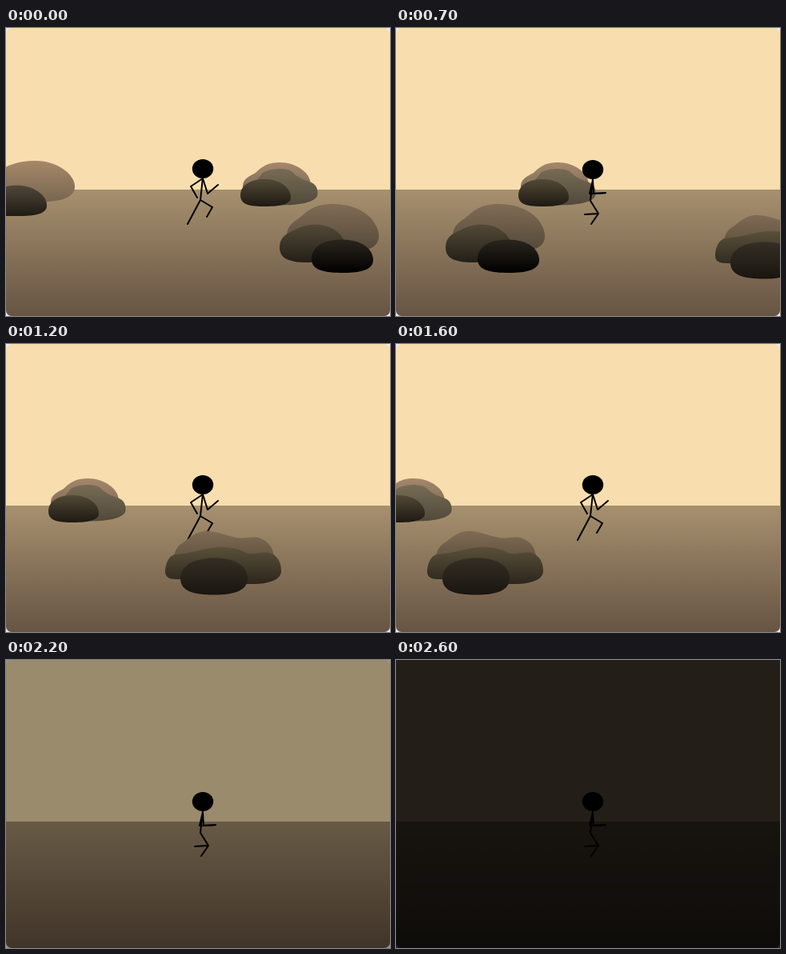
Recreate the animation shown at these times as an HTML page. Size 480 by 360 pixels, loop 2700 ms.

```html
<!DOCTYPE html>
<html lang="en">
<head>
<meta charset="utf-8">
<title>Desert run</title>
<style>
  html, body { margin: 0; width: 100%; height: 100%; overflow: hidden; background: #e5f0ff; }
  svg { display: block; width: 480px; height: 360px; }
  .pose { fill: none; stroke: #000; stroke-width: 2; stroke-linecap: round; stroke-linejoin: round; }
  .pose ellipse { fill: #000; stroke: none; }
</style>
</head>
<body>
<svg viewBox="0 0 480 360">
  <defs>
    <clipPath id="stage"><rect width="480" height="360" rx="7"/></clipPath>
  </defs>
  <g clip-path="url(#stage)">
    <rect width="480" height="360" fill="#f8deae"/>
    <rect id="ground" y="202" width="480" height="158"/>
    <g id="far"></g>
    <g id="runner">
      <g class="pose">
        <ellipse cx="246" cy="176" rx="13.2" ry="12"/>
        <path d="M246 187L243 215M246 188L231 198L239 212M246 188L252 207L265 196M243 215L227 245M243 215L258 224L251 236"/>
      </g>
      <g class="pose">
        <ellipse cx="246" cy="175" rx="13" ry="12"/>
        <path d="M246 186L243 214M246 187L230 196L238 211M246 187L252 206L264 193M243 214L233 227L218 233M243 214L258 222L265 235"/>
      </g>
      <g class="pose">
        <ellipse cx="246" cy="177" rx="13.2" ry="12"/>
        <path d="M246 188L243 216M246 190L242 207L262 206M246 190L247 207L261 206.5M243 216L253 232L244 245M253 232L236 233"/>
      </g>
    </g>
    <g id="near"></g>
  </g>
  <rect id="fade" width="480" height="360"/>
</svg>
<script>
const STEP = 100, STEPS = 27;
const NS = 'http://www.w3.org/2000/svg';
const $ = id => document.getElementById(id);

function add(parent, tag, attrs) {
  const el = document.createElementNS(NS, tag);
  for (const k in attrs) el.setAttribute(k, attrs[k]);
  return parent.appendChild(el);
}

let gradients = 0;
function shade(top, bottom) {
  const id = 'shade' + gradients++;
  const g = add(document.querySelector('defs'), 'linearGradient', { id, x2: 0, y2: 1 });
  add(g, 'stop', { 'stop-color': top });
  add(g, 'stop', { offset: 1, 'stop-color': bottom });
  return `url(#${id})`;
}

// Lobes run from back to front: top colour, bottom colour, outline.
function rocks(layer, lobes) {
  for (const [top, bottom, d] of lobes) add(layer, 'path', { d, fill: shade(top, bottom) });
}

const far = $('far'), near = $('near'), fade = $('fade');
const poses = [...$('runner').children];
$('ground').setAttribute('fill', shade('#a6906e', '#675443'));

rocks(far, [
  ['#a68869', '#786650', 'M-14 182C4 169 20 166 38 166C64 166 86 183 86 198C86 211 70 217 48 217H-14Z'],
  ['#50473a', '#1f1b14', 'M-14 202C0 197 10 196 20 197C37 199 51 210 51 222C51 231 40 235 18 235H-14Z'],
  ['#a5876c', '#7a6a54', 'M296 200C295 189 303 186 312 181C322 171 330 168 342 168C363 168 381 181 381 196C380 212 300 213 296 200Z'],
  ['#766c55', '#51493a', 'M306 202C312 190 317 187 320 182C328 175 351 174 358 180C365 187 370 189 379 192C388 195 390 201 389.500 208C388 222 345 223 326 220Z'],
  ['#524936', '#1d1912', 'M293 209C293 196 306 189 323 189C343 189 356 200 356 212C356 220 343 223 325 223C304 223 293 221 293 209Z']
]);

rocks(near, [
  ['#806c56', '#544838', 'M351 264C350 250 356 244 366 238C376 230 384 220 408 220C436 220 452 232 458 240C464 248 466 254 466 260C466 272 456 278 440 278C410 280 370 280 351 264Z'],
  ['#524937', '#241f17', 'M342 274C342 262 350 257 360 253C370 247 380 245 393 246C408 248 417 256 422 264C430 280 400 294 372 293C350 292 342 286 342 274Z'],
  ['#2b251d', '#000', 'M382 289C382 273 397 264.500 420 264.500C444 264.500 459 276 459 290C459 302 444 306 422 306C398 306 382 303 382 289Z']
]);

const late = add(near, 'g', { transform: 'translate(480)' });
rocks(late, [
  ['#806b54', '#544838', 'M209 270C211 258 214 252 222 248C234 238 242 233 254 234C268 235 276 240 288 242C300 244 308 239 318 243C330 248 334 256 335 266C332 288 215 288 209 270Z'],
  ['#595039', '#2c261c', 'M199 285C199 276 203 264 212 263C232 262 248 255 264 254C290 253 296 260 304 262C314 263 322 258 332 262C342 267 344 276 344 284C344 294 330 300 308 300C260 300 230 294 212 294C204 294 199 291 199 285Z'],
  ['#342e24', '#19150f', 'M218 293C218 277 235 267.500 261 267.500C287 267.500 302 278 302 293C302 308 286 313.500 260 313.500C234 313.500 218 309 218 293Z']
]);

function draw() {
  const n = Math.floor(performance.now() / STEP) % STEPS;
  far.setAttribute('transform', `translate(${-20 * n})`);
  near.setAttribute('transform', `translate(${-40 * n})`);

  // The stride lasts a little less than four steps.
  const stride = (n + 0.46) / 3.85 % 1;
  const pose = Math.floor(stride * 3);
  poses.forEach((p, i) => p.style.display = i === pose ? '' : 'none');

  fade.setAttribute('opacity', n < 21 ? 0 : 0.255 + 0.121 * (n - 21));
  requestAnimationFrame(draw);
}
draw();
</script>
</body>
</html>
```
